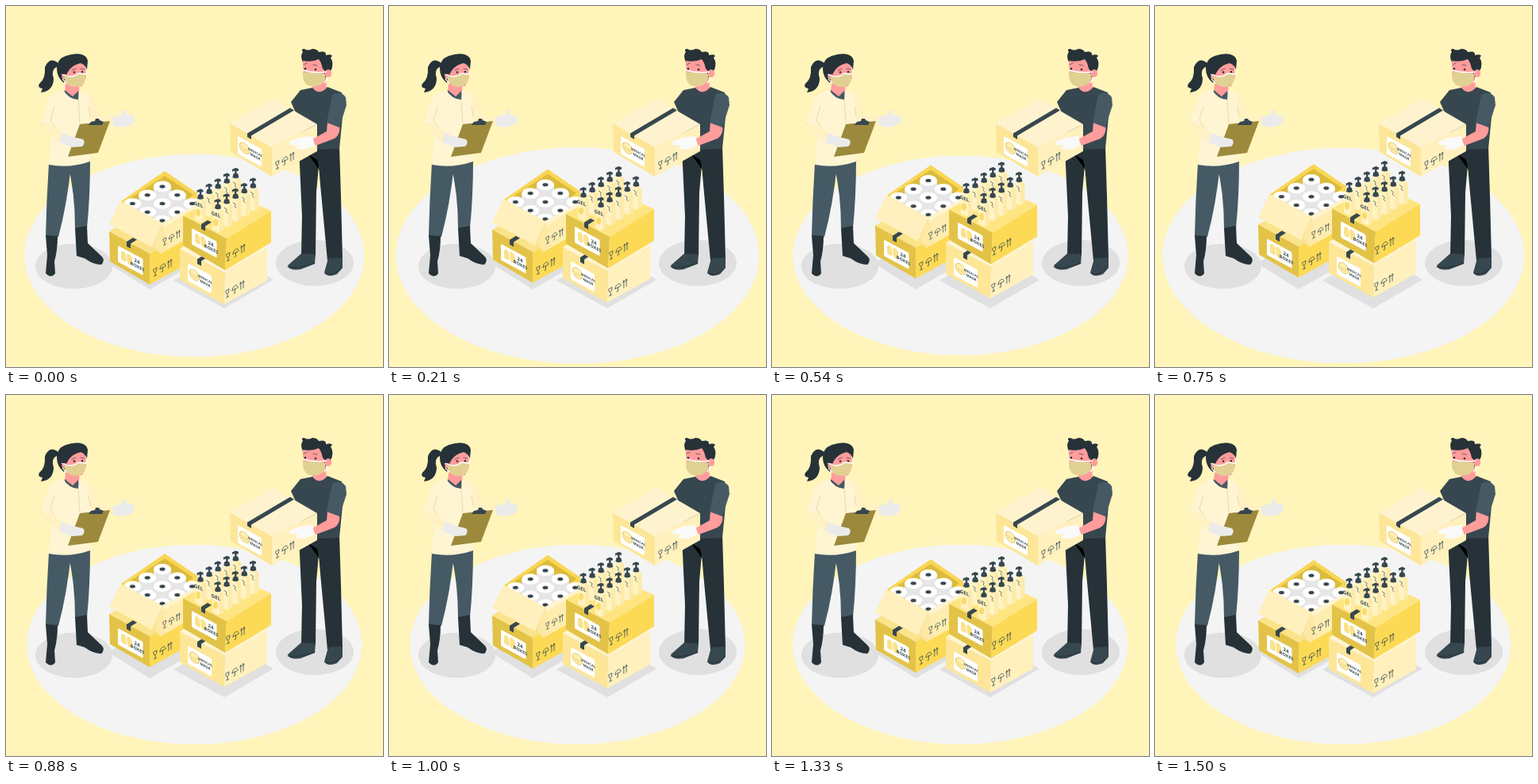
Write an HTML page that moves like this. It is 475 px wide and 455 px high and loops after 1540 ms.

```html
<!DOCTYPE html>
<html lang="en">
<head>
<meta charset="utf-8">
<title>Supplies delivery</title>
<style>
html, body { margin: 0; width: 100%; height: 100%; overflow: hidden; background: #fff4ba; }
svg { display: block; width: 475px; height: 455px; }
text { font: 700 5px "Open Sans", Roboto, sans-serif; font-stretch: 75%; fill: #37474f; text-anchor: middle; }
.dark { fill: #263238; }
.slate { fill: #37474f; }
.blue { fill: #455a64; }
.skin { fill: #ff9c9c; }
.mask { fill: #e0d193; }
.coat { fill: #fff5d3; }
.sleeve { fill: #fff1c2; }
.glove { fill: #ebebeb; }
.shadow { fill: #e0e0e0; }
.line { fill: none; stroke: #37474f; stroke-width: .7; stroke-linecap: round; }
.strap { fill: none; stroke: #fff; stroke-width: 1.3; }
.fold { fill: none; stroke: #e6d9a4; stroke-width: .9; }
</style>
</head>
<body>
<svg viewBox="0 0 475 455">
<defs>
  <g id="maskLabel">
    <rect width="30" height="22.5" rx="1.5" fill="#fff"/>
    <circle cx="8.5" cy="10.500" r="6.3" fill="#ffefb4" stroke="#e3c65e" stroke-width=".8"/>
    <path d="M3 10q6 3 11-1M4 13q5 2 9-1" fill="none" stroke="#e3c65e" stroke-width=".6"/>
    <text x="22" y="10" style="font-size:4px">MEDICAL</text>
    <text x="22" y="15.5" style="font-size:4.6px">MASK</text>
  </g>
  <g id="boxLabel">
    <rect width="31.5" height="20.5" rx="1.5" fill="#fff"/>
    <path d="M4 6c2-4 6-3 6 1l1 6c0 3-6 4-7 1zM11 5c2-3 6-2 7 2v7c-1 3-6 3-6 0z" fill="#fbe28a"/>
    <text x="24" y="9" style="font-size:6px">24</text>
    <text x="24.500" y="15" style="font-size:5.4px">BOXES</text>
  </g>
  <g id="icons" class="line">
    <path d="M0 0h4.4l-.7 4q-1.6 2-3 0zM2.2 5.4V9M.5 9h3.5"/>
    <path d="M8.5 4q.8-4 4-4t4 4zM12.5 4v5q-1.5 1.5-1.7-.5"/>
    <path d="M20.5 9V0m-1.2 2 1.2-2 1.2 2M24 9V0m-1.2 2L24 0l1.2 2"/>
  </g>
  <path id="tape" class="slate" d="M0 4 8-1l5 2.700-8 5v6l-5-2.700z"/>
  <g id="roll">
    <path d="M-11 0v15a11 6.800 0 0 0 22 0V0z" fill="#e6e6e6"/>
    <ellipse rx="11" ry="6.8" fill="#fff"/>
    <ellipse rx="4.2" ry="2.600" fill="#d5d5d5"/>
    <ellipse rx="3.3" ry="2" class="slate"/>
  </g>
  <g id="bottle">
    <path d="M-7 12q0-4 5-5h4q5 1 5 5v22L0 37.500l-7-4z" fill="#fff3c2"/>
    <path d="M2 7.500q5 1 5 4.500v22l-5 2.500z" fill="#fdeaab"/>
    <path class="slate" d="M-4.500-3 0-5l3.500 1.300V-1H1.200v3l1.800.6 1 4.400q-4 2.500-8 0l1-4.400L-1.200 2v-3l-1.800-.2-1.200 1.400z"/>
  </g>
</defs>

<ellipse id="floor" cx="237.300" cy="314.500" fill="#f4f4f4"/>
<g class="shadow">
  <ellipse cx="85.5" cy="328" rx="48.5" ry="28.5"/>
  <ellipse cx="389" cy="324" rx="49" ry="29"/>
  <path d="M128 324 181 357 232 328 180 296zM211 346 275 381 337 345 275 308z"/>
</g>

<g id="woman">
  <path class="blue" d="M54 198 82 200Q77 250 66 291L50 290Q51 245 54 198zM78 200 106 195Q106 240 102 280L87 281Q87 235 78 200z"/>
  <path class="dark" d="M50 289 65 290Q65 308 61 322L62 337Q57 344 50 337L52 314zM87 280 102 277 103 299 121 316Q125 321 120 326 110 326 99 318L89 315z"/>
  <path class="sleeve" d="M102 110Q112 116 118 139L134 139 135 151 112 153 100 140z"/>
  <path class="glove" d="M134 140 146 137 148 131 152 132 152 137 161 138 162 145 158 150 146 153 135 151z"/>
  <path class="skin" d="M75 98 92 100 93 113 84 119 74 110z"/>
  <path class="blue" d="M74 106 84 114 91 107 93 120 83 120 73 112z"/>
  <path class="coat" d="M72 106Q80 118 91 118L92 106 103 110Q107 125 106 150L106 196Q80 205 54 200L57 165 52 158 43 148 54 117Q61 107 72 106z"/>
  <path class="fold" d="M91 118 93 148M61 126 56 144 68 162M43 148 55 151M104 126l2 14"/>
  <path d="M93 149 131 145 116 185 78 190z" fill="#9c893c"/>
  <path class="slate" d="M104 150 107 146 112 145 113 142 117 142 118 144 123 146 121 150z"/>
  <path class="sleeve" d="M43 146 51 158 67 172 72 162 58 149z"/>
  <path class="glove" d="M70 160 84 165 97 168Q101 172 96 177L84 178 67 172z"/>
  <path class="dark" d="M66 72Q55 63 49 77 50 92 42 98 39 103 46 104L44 109Q60 107 60 91 56 79 66 76z"/>
  <path class="skin" d="M74 74 100 71 101 90 96 101 83 103 72 94z"/>
  <path class="dark" d="M64 79Q64 67 75 63 87 59 95 61 102 63 103 69L102 80Q100 74 94 72 85 74 80 80 77 84 76 87L73 97Q64 90 64 79z"/>
  <circle class="skin" cx="73.500" cy="89" r="3.2"/>
  <path class="mask" d="M73 89Q86 89 91 85L101 86 99 96Q95 102 86 102 75 101 73 89z"/>
  <path class="strap" d="M70 86Q84 92 91 85L101 86M71 92 76 97M101 86 102 82"/>
  <path class="line" d="M83 81 88 79M94 79 99 80"/>
  <circle class="dark" cx="86" cy="83.500" r="1.3"/><circle class="dark" cx="96" cy="83" r="1.3"/>
</g>

<g id="stack">
  <path d="M130 284 181 312 181 351 131 322z" fill="#e3c347"/>
  <path d="M181 312 223 288 223 328 181 351z" fill="#fcda55"/>
  <path d="M130 284 181 256 223 288 181 312z" fill="#fbe38a"/>
  <use href="#tape" x="152" y="293"/>
  <use href="#boxLabel" transform="matrix(1 .54 0 1 141 302)"/>
  <use href="#icons" transform="matrix(.92 -.52 0 1 186 332)"/>

  <path d="M200 208 241 236 240 260 197 286 145 246z" fill="#f9d653"/>
  <path d="M200 214 236 238 197 270 151 246z" fill="#dcbb3c"/>
  <g id="rolls"></g>
  <path d="M145 246 197 274 195 312 145 282z" fill="#fbe28e"/>
  <path d="M197 273 241 250 241 286 195 312z" fill="#ffedb0"/>
  <path d="M144 246 197 274 184 304 130 275z" fill="#fff0bd"/>
  <path d="M197 274 205 305 195 312 187 302z" fill="#fde9a6"/>
  <path d="M197 274 240 250 240 254 199 279z" fill="#fff4cf"/>
  <use href="#icons" transform="matrix(.85 -.46 0 .9 198 294)"/>

  <path d="M219 306 276 336 275 376 219 345z" fill="#fde698"/>
  <path d="M276 336 329 304 329 346 275 376z" fill="#fff0bd"/>
  <path d="M219 306 274 276 329 304 276 336z" fill="#fff5d4"/>
  <use href="#tape" x="241" y="315"/>
  <use href="#maskLabel" transform="matrix(1 .54 0 1 229 324)"/>
  <use href="#icons" transform="matrix(.92 -.52 0 1 277 359)"/>

  <path d="M223 264 278 293 276 333 223 302z" fill="#e3c347"/>
  <path d="M278 293 334 258 334 298 276 333z" fill="#fcda55"/>
  <path d="M223 264 278 234 334 258 278 293z" fill="#ffe581"/>
  <use href="#tape" x="246" y="271"/>
  <use href="#boxLabel" transform="matrix(1 .54 0 1 234 280)"/>
  <use href="#icons" transform="matrix(.92 -.52 0 1 278 313)"/>
  <g id="bottles"></g>
</g>

<g id="man">
  <path class="dark" d="M369 178 420 176 422 240 424 319 405 321 396 225 394 201 391 235 390 315 372 315 373 265z"/>
  <path d="M380 186 392 194 395 207 391 201z"/>
  <path class="slate" d="M372 312 390 313 389 325 371 332Q356 334 355 327zM406 318 424 317 424 330 417 338Q405 343 401 336z"/>
  <path class="line" style="stroke:#202a30" d="M355 329Q368 332 389 324M402 337Q412 341 423 330"/>
  <path class="skin" d="M387 95 403 90 404 105Q394 116 385 107z"/>
  <path class="slate" d="M371 106 386 103Q395 114 405 102L423 109 424 140 420 180 370 182 372 150 359 121z"/>
  <path class="dark" d="M374 71Q370 62 374 58 371 54 376 54 380 57 386 54 392 54 394 58 404 56 403 62 410 60 411 63L409 65Q414 73 409 82L401 92 380 76z"/>
  <path class="skin" d="M374 69Q386 71 394 67 397 70 399 79L402 82 398 98 385 101 375 94z"/>
  <ellipse class="skin" cx="406" cy="85" rx="4.2" ry="5"/>
  <path class="mask" d="M374 84Q388 82 403 86L401 95Q395 103 384 101 374 100 374 84z"/>
  <path class="strap" d="M374 81Q389 85 404 83M401 97 406 90"/>
  <path class="line" d="M375 74 379 72M387 74 392 75"/>
  <circle class="dark" cx="377" cy="79" r="1.3"/><circle class="dark" cx="390" cy="80" r="1.3"/>

  <path d="M282 148 335 178 335 215 283 184z" fill="#fde698"/>
  <path d="M335 178 392 149 392 183 335 215z" fill="#fff0bd"/>
  <path d="M282 148 337 117 392 149 335 178z" fill="#fff3cf"/>
  <path class="slate" d="M304 160.500 358 128.500 363 131.500 309 163.500 309 168 304 165z"/>
  <use href="#maskLabel" transform="matrix(1 .54 0 1 292 164)"/>
  <use href="#icons" transform="matrix(.92 -.52 0 1 340 197)"/>
  <path class="skin" d="M405 146 420 150Q422 162 414 167L390 176 386 168 404 158z"/>
  <path class="blue" d="M411 112Q421 106 428 115L429 125 420 153 404 147z"/>
  <path class="glove" style="fill:#fafafa" d="M357 171 369 166 386 164 389 176 376 181 364 180 368 176 358 175z"/>
</g>
</svg>

<script>
const LOOP = 1540, LEAD = 45;
const $ = id => document.getElementById(id);
const place = (id, x, y) => `<use href="#${id}" x="${x}" y="${y}"/>`;

let rolls = '', bottles = '';
for (let row = 0; row < 3; row++)
  for (let col = 0; col < 3; col++)
    rolls += place('roll', 197 + 18.8 * (col - row), 227.500 + 10.8 * (col + row));
$('rolls').innerHTML = rolls;

for (const [x, y] of [[245, 235.5], [267, 248]]) {
  for (let i = 4; i >= 0; i--) {
    const px = x + 11.1 * i, py = y - 6.6 * i;
    bottles += place('bottle', px, py);
    if (i) bottles += `<path class="line" d="M${px - 3} ${py + 13}l3 2-1 3 2 2"/>`;
  }
  bottles += `<text transform="matrix(1 .4 0 1 ${x - 2.5} ${y + 17})" style="font-size:6.2px">GEL</text>
    <ellipse cx="${x - 3}" cy="${y + 25}" rx="3.2" ry="4.5" fill="#fbdc6a"/>`;
}
$('bottles').innerHTML = bottles;

const smooth = u => (u = Math.min(1, Math.max(0, u)), u * u * (3 - 2 * u));
const beat = (t, start, peak, end) =>
  t < peak ? smooth((t - start) / (peak - start)) : smooth((end - t) / (end - peak));

function draw() {
  const t = (performance.now() + LEAD) % LOOP;
  const scale = 1 + .096 * (beat(t, 0, 185, 515) + beat(t, 620, 757, 905));
  $('floor').setAttribute('rx', 211 * scale);
  $('floor').setAttribute('ry', 125.8 * scale);
  const lift = 4.4 * (1 - Math.cos(2 * Math.PI * t / LOOP));
  $('stack').setAttribute('transform', `translate(0 ${-lift})`);
  requestAnimationFrame(draw);
}
draw();
</script>
</body>
</html>
```
